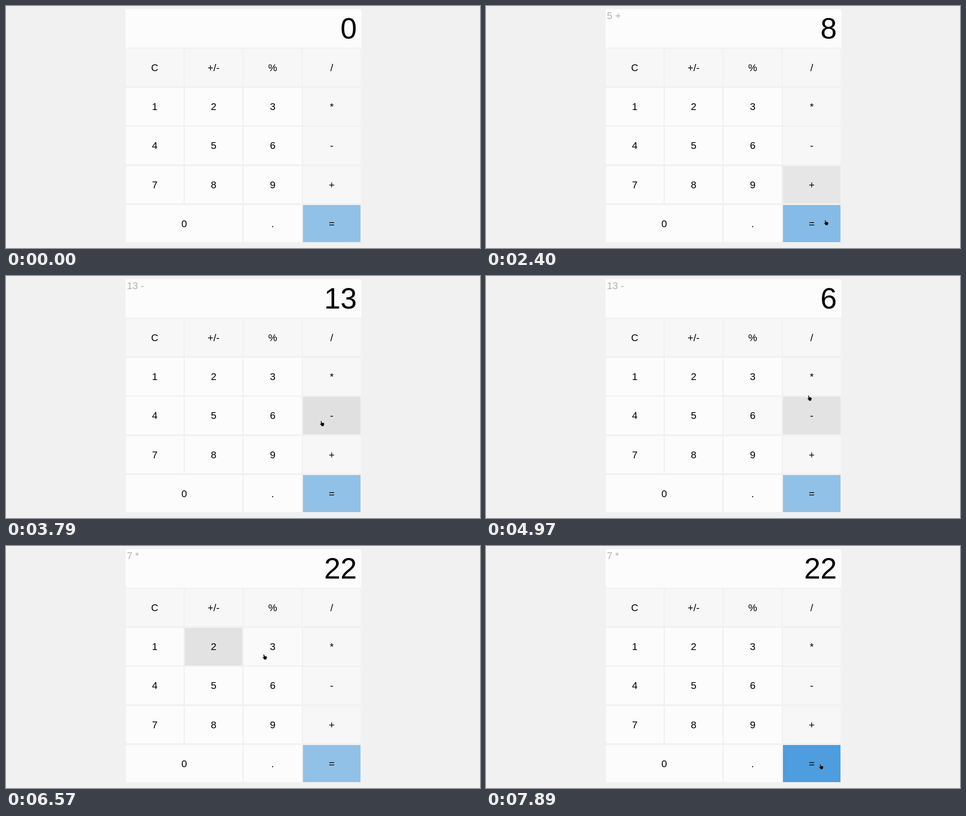
Recreate the animation shown at these times as an HTML page. Size 1047 by 535 pixels, loop 7990 ms.

```html
<!DOCTYPE html>
<html lang="en">
<head>
<meta charset="utf-8">
<title>Calculator</title>
<style>
  html, body { margin: 0; width: 100%; height: 100%; overflow: hidden; background: #f1f1f1; }
  svg { display: block; width: 100%; height: 100%; }
  text { font-family: Arial, "Liberation Sans", sans-serif; white-space: pre; }
</style>
</head>
<body>
<svg id="stage" viewBox="0 0 1047 535">
  <rect width="1047" height="535" fill="#f1f1f1"/>
  <rect x="264" y="7" width="521" height="85" fill="#fcfcfc"/>
  <text id="history" x="267" y="29" font-size="22" fill="#b2b2b2"></text>
  <text id="display" x="775" y="72" font-size="65" text-anchor="end"></text>
  <g id="keys" font-size="22" text-anchor="middle"></g>
  <path id="hand" fill="#000" stroke="#fff" stroke-opacity=".5" stroke-width=".6"
    d="M-3.2-5.2Q-2.2-6.6-1.2-5.2L-.6-1.8Q2-2.2 4-.9Q5-.4 4.7 1.2L3.6 4.2V5.8H-1.8V4.6L-4.6 1.4Q-5.3 0-3.6.1L-2.5 1Z"/>
</svg>
<script>
const LOOP = 7990, FADE = 500, ENTER = 30;
const $ = id => document.getElementById(id);
const lerp = (a, b, u) => a + (b - a) * u;
const lastBefore = (list, t) => list.findLast(item => item.at <= t);

function add(parent, tag, attrs) {
  const node = document.createElementNS("http://www.w3.org/2000/svg", tag);
  for (const name in attrs) node.setAttribute(name, attrs[name]);
  return parent.appendChild(node);
}

// CSS "ease": cubic-bezier(.25, .1, .25, 1)
function ease(x) {
  if (x >= 1) return 1;
  let lo = 0, hi = 1, s;
  for (let n = 0; n < 18; n++) {
    s = (lo + hi) / 2;
    if (.75 * s * (1 - s) + s ** 3 < x) lo = s; else hi = s;
  }
  return .3 * s * (1 - s) ** 2 + 3 * s * s * (1 - s) + s ** 3;
}

// Keypad: a key named twice in a row of labels spans both columns
const themes = {
  digit: { rest: [252, 252, 252], hover: [224, 224, 224] },
  operator: { rest: [247, 247, 247], hover: [224, 224, 224] },
  equals: { rest: [145, 193, 231], hover: [74, 156, 223] }
};
const keys = {};
["C +/- % /", "1 2 3 *", "4 5 6 -", "7 8 9 +", "0 0 . ="].forEach((line, row) => {
  line.split(" ").forEach((label, col, labels) => {
    if (keys[label]) return;
    const span = labels.lastIndexOf(label) - col;
    const left = 264.7 + 130.3 * col, top = 94.9 + 86.25 * row;
    const x = Math.round(left), right = Math.round(left + 127.2 + 130.3 * span);
    const y = Math.round(top), bottom = Math.round(top + 82.4);
    const theme = label === "=" ? themes.equals : !row || col === 3 ? themes.operator : themes.digit;
    const rect = add($("keys"), "rect", { x, y, width: right - x, height: bottom - y });
    add($("keys"), "text", { x: (x + right) / 2, y: top + 49 }).textContent = label;
    keys[label] = { x, y, right, bottom, theme, rect, over: false, fades: [{ at: 0, from: 0, to: 0 }] };
  });
});

// Cursor stops: a key, the offset from its centre, arrival and (if it rests) departure
const stop = (label, dx, dy, arrive, leave = arrive) => {
  const { x, y, right, bottom } = keys[label];
  return { x: (x + right) / 2 + dx, y: (y + bottom) / 2 + dy, at: arrive, leave };
};
const stops = [
  { x: 985, y: 540, at: 0, leave: ENTER },
  stop("5", 27, 19, 770, 910),
  stop("+", -8, 9, 1165, 1590),
  stop("8", 32, 1, 1780, 1870),
  stop("+", 16, 17, 2080, 2230),
  stop("=", 33, 2, 2430, 2940),
  stop("-", 3, 20, 3480, 3670),
  stop("6", 8, 8, 4100, 4560),
  stop("-", -12, -12, 4750),
  stop("*", 5, 12, 5240, 5600),
  stop("2", 31, 22, 6100, 6470),
  stop("*", -29, 24, 6700),
  stop("-", 62, 11, 7130),
  stop("=", 21, 7, 7700, LOOP)
];

function cursorAt(t) {
  const from = lastBefore(stops, t), to = stops[stops.indexOf(from) + 1] || from;
  const u = to === from ? 0 : Math.max(0, (t - from.leave) / (to.at - from.leave));
  const s = u * u * (3 - 2 * u);
  return { x: lerp(from.x, to.x, s), y: lerp(from.y, to.y, s) };
}

// Run the presses through a small calculator and record what it shows
const readouts = [{ at: 0, display: "0", history: "" }];
const presses = { 850: "5", 1500: "+", 1810: "8", 2470: "=", 3650: "-", 4370: "6", 5550: "*", 6160: "2", 6380: "2" };
const operations = { "+": (a, b) => a + b, "-": (a, b) => a - b, "*": (a, b) => a * b };
let display = "0", history = "", fresh = true, operand, operator;
for (const [at, label] of Object.entries(presses)) {
  if (/\d/.test(label)) {
    display = fresh ? label : display + label;
    fresh = false;
  } else {
    const compute = operations[operator];
    if (compute) display = String(compute(operand, +display));
    history = `${display} ${label}`;
    operand = +display;
    operator = label;
    fresh = true;
  }
  readouts.push({ at: +at, display, history });
}

function hoverLevel(key, t) {
  const { at, from, to } = lastBefore(key.fades, t);
  return lerp(from, to, ease((t - at) / FADE));
}

// Work out when the fingertip enters and leaves each key
for (let t = ENTER; t < LOOP; t += 5) {
  const hand = cursorAt(t), x = hand.x - 2, y = hand.y - 5;
  for (const key of Object.values(keys)) {
    const over = x >= key.x && x < key.right && y >= key.y && y < key.bottom;
    if (over === key.over) continue;
    key.fades.push({ at: t, from: hoverLevel(key, t), to: +over });
    key.over = over;
  }
}

function draw(t) {
  const shown = lastBefore(readouts, t);
  $("display").textContent = shown.display;
  $("history").textContent = shown.history;
  for (const key of Object.values(keys)) {
    const level = hoverLevel(key, t), { rest, hover } = key.theme;
    key.rect.setAttribute("fill", `rgb(${rest.map((c, i) => Math.round(lerp(c, hover[i], level)))})`);
  }
  const { x, y } = cursorAt(t);
  $("hand").setAttribute("transform", `translate(${x.toFixed(1)} ${y.toFixed(1)})`);
  $("hand").setAttribute("visibility", t < ENTER ? "hidden" : "visible");
}

const began = performance.now();
function tick() {
  draw((performance.now() - began) % LOOP);
  requestAnimationFrame(tick);
}
tick();
</script>
</body>
</html>
```
